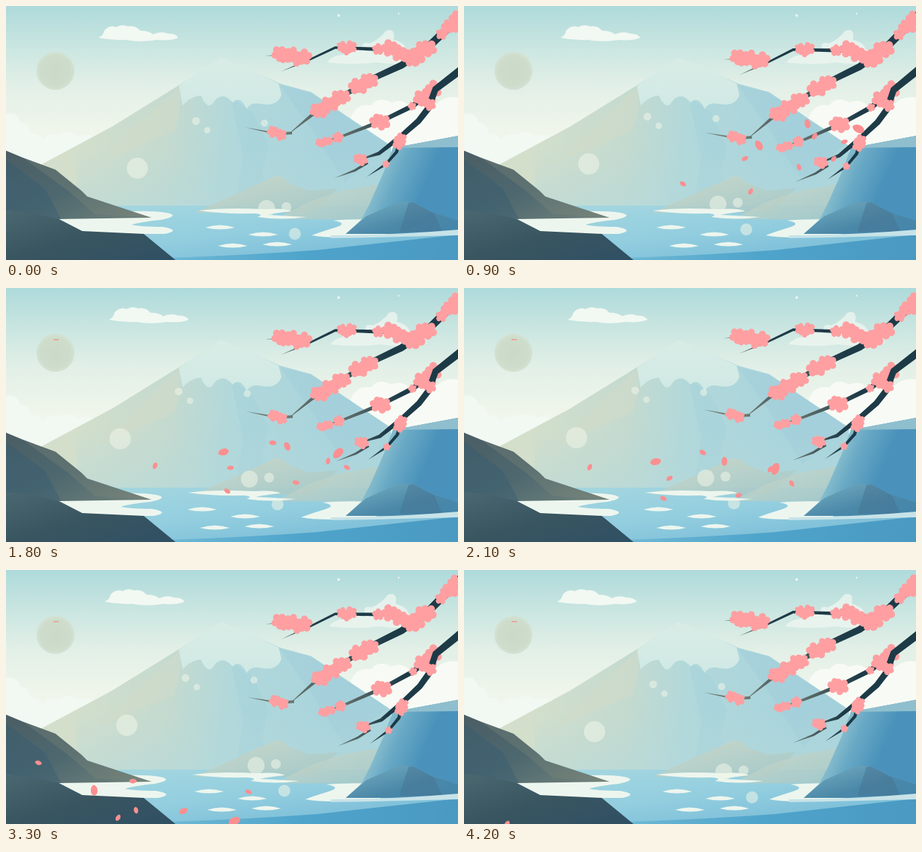
An HTML page that plays this animation: 640x360 px, repeating every 4500 ms.

```html
<!DOCTYPE html>
<html lang="en">
<head>
<meta charset="utf-8">
<title>Blossom lake</title>
<style>
html, body { margin: 0; width: 100%; height: 100%; overflow: hidden; background: #bfe0de; }
svg { display: block; width: 100vw; height: 100vh; }
</style>
</head>
<body>
<svg viewBox="0 0 640 360" preserveAspectRatio="none">
  <defs>
    <linearGradient id="sky" x2="0" y2="1">
      <stop stop-color="#aedadb"/><stop offset=".26" stop-color="#cbe6e1"/>
      <stop offset=".5" stop-color="#e3f0e7"/><stop offset=".8" stop-color="#f1f6ec"/>
    </linearGradient>
    <radialGradient id="sun">
      <stop stop-color="#cbdac8"/><stop offset=".8" stop-color="#cedccb"/><stop offset="1" stop-color="#d3e2d4"/>
    </radialGradient>
    <linearGradient id="peak" gradientUnits="userSpaceOnUse" x1="90" y1="170" x2="460" y2="200">
      <stop stop-color="#d4dfcb"/><stop offset=".38" stop-color="#c4dacf"/>
      <stop offset=".62" stop-color="#b1d8db"/><stop offset="1" stop-color="#a9d4dc"/>
    </linearGradient>
    <linearGradient id="mist" x2="0" y2="1">
      <stop stop-color="#b4d9dc" stop-opacity="0"/><stop offset="1" stop-color="#b4d9dc" stop-opacity=".8"/>
    </linearGradient>
    <linearGradient id="snow" x2="0" y2="1">
      <stop stop-color="#d9ece5"/><stop offset="1" stop-color="#d0e9e5"/>
    </linearGradient>
    <linearGradient id="water" x2="1" y2="1">
      <stop stop-color="#a9d9e0"/><stop offset=".5" stop-color="#93cedf"/><stop offset="1" stop-color="#6fb5d5"/>
    </linearGradient>
    <linearGradient id="near" x2="1" y2="0">
      <stop stop-color="#72bbd6"/><stop offset=".5" stop-color="#4fa4cb"/><stop offset="1" stop-color="#4a99c2"/>
    </linearGradient>
    <linearGradient id="cliff" gradientUnits="userSpaceOnUse" x1="515" y1="230" x2="590" y2="262">
      <stop stop-color="#9ccbd3"/><stop offset=".5" stop-color="#69a9c5"/><stop offset="1" stop-color="#4a92bb"/>
    </linearGradient>
    <linearGradient id="rock" x2="1" y2="1">
      <stop stop-color="#78b0c3"/><stop offset=".6" stop-color="#4b88a8"/><stop offset="1" stop-color="#4285ab"/>
    </linearGradient>
    <linearGradient id="bank" x2="1" y2="1">
      <stop stop-color="#4a5d64"/><stop offset=".5" stop-color="#4e686f"/><stop offset="1" stop-color="#73847c"/>
    </linearGradient>
    <linearGradient id="shore" x2="1" y2="1">
      <stop stop-color="#4b6871"/><stop offset=".5" stop-color="#395560"/><stop offset="1" stop-color="#2f5064"/>
    </linearGradient>
    <linearGradient id="knoll" x2="1" y2="1">
      <stop stop-color="#cfd9c7"/><stop offset="1" stop-color="#a3c6c6"/>
    </linearGradient>
  </defs>

  <rect width="640" height="230" fill="url(#sky)"/>
  <g fill="#e9f4ee"><circle cx="471" cy="13.500" r="2"/><circle cx="556" cy="11" r="1.200"/></g>
  <circle cx="70" cy="92" r="27" fill="url(#sun)"/>
  <path id="glint" d="M67 74Q68 71 71 73Q74 71 75 74Z" fill="#ef928b"/>

  <g fill="#f2f8f2">
    <path id="cloud" d="M131 45Q138 42 139 35Q147 26 156 30Q164 25 173 29Q183 27 190 35Q202 35 208 40Q220 35 229 39Q241 39 244 45Q232 50 214 48Q189 52 170 48Q150 49 131 45Z"/>
    <path id="veil" d="M455 80Q461 70 478 69Q492 60 505 61Q502 50 515 53Q528 48 538 35Q552 30 549 48Q565 52 567 62Q588 65 591 78Q560 85 525 80Q490 84 455 80Z" opacity=".7"/>
    <path d="M0 153Q17 150 20 165Q33 166 35 180Q47 180 52 190Q60 178 75 183Q88 174 101 184Q118 179 126 188Q139 172 158 173L180 230H0Z"/>
    <path d="M488 158Q497 137 517 141Q527 127 546 137Q561 130 573 143Q590 130 608 140Q623 126 640 130V210H500Z" fill="#f8fbf5"/>
  </g>

  <path d="M40 230L150 171L247 111L290 84Q310 76 330 84L388 110L432 122L545 198V300H130Z" fill="url(#peak)"/>
  <path d="M247 112L202 154L130 222L212 188L238 178Q248 152 247 137Z" fill="#d3dac6" opacity=".45"/>
  <path d="M318 129L350 152L372 199L362 240L402 276L325 284L336 214Z" fill="#9dccd7" opacity=".3"/>
  <path d="M388 112L432 123L540 195L480 250L436 180Z" fill="#98c8d8" opacity=".3"/>
  <path d="M245 113L288 83L304 74L333 84L386 110L390 126Q384 143 362 139Q346 135 341 146Q331 126 321 137Q305 118 292 139Q284 146 276 127Q263 127 250 141Z" fill="url(#snow)"/>
  <rect x="100" y="200" width="430" height="84" fill="url(#mist)" opacity=".6"/>

  <rect y="283" width="640" height="77" fill="url(#water)"/>
  <path d="M266 293L318 270L382 241Q394 241 399 250L430 262L470 258L435 293Z" fill="url(#knoll)" opacity=".85"/>
  <path d="M382 302L428 278L474 262L545 250V303Z" fill="url(#knoll)" opacity=".8"/>

  <g id="rivers" fill="#edf6ee">
    <path d="M40 298H190Q177 293 160 292Q202 289 227 293Q248 297 220 303Q190 306 178 310Q190 313 222 313Q249 318 225 323H40Z"/>
    <path d="M273 290Q310 285 365 288Q397 286 404 291Q384 293 369 296L425 299Q390 304 356 299Q367 295 351 294Q305 295 273 290Z"/>
    <path d="M540 303Q492 301 463 304Q486 308 466 314Q446 320 433 325Q461 331 540 325Z"/>
  </g>
  <g id="floes" fill="#edf6ee"></g>

  <path d="M640 184L570 197L548 200L535 235L515 280L503 303L481 323H640Z" fill="url(#cliff)"/>
  <path d="M640 184L570 197L560 201L640 200Z" fill="#8fbfce"/>
  <path d="M481 323L510 298L557 277L576 278L605 293L640 304V323Z" fill="url(#rock)"/>
  <path d="M557 320L570 279L576 278L606 294L618 320Z" fill="#477591" opacity=".5"/>
  <path d="M200 358Q330 354 440 346L640 324V360H200Z" fill="url(#near)"/>
  <path d="M460 325Q545 325 640 317V325L520 328L460 329Z" fill="#c7e3e8"/>

  <path d="M0 205L24 215L70 232L107 262L115 270L206 300L75 302L0 304Z" fill="url(#bank)"/>
  <path d="M24 215L70 232L107 262L115 270L206 300L126 295L88 262Z" fill="#838878" opacity=".3"/>
  <path d="M0 218L55 259L78 302H0Z" fill="#335b70" opacity=".4"/>
  <path d="M0 289L40 294L75 302L108 319L195 323L240 360H0Z" fill="url(#shore)"/>

  <g id="bubbles" fill="#f0f6e8" opacity=".55"></g>
  <g id="tree"></g>
  <g id="petals" fill="#fb8f90"></g>
</svg>

<script>
const LOOP = 4500, STEP = 300;
const $ = id => document.getElementById(id);
const add = (tag, attrs, parent) => {
  const el = document.createElementNS('http://www.w3.org/2000/svg', tag);
  for (const k in attrs) el.setAttribute(k, attrs[k]);
  return parent.appendChild(el);
};
let seed = 7;
const rnd = () => (seed = seed * 16807 % 2147483647) / 2147483647;

// Height of a limb at x; limbs run from right to left
function heightAt(pts, x) {
  let i = 1;
  while (i < pts.length - 1 && x < pts[i][0]) i++;
  const [ax, ay] = pts[i - 1], [bx, by] = pts[i];
  return ay + (by - ay) * (x - ax) / (bx - ax);
}

function limb({ pts, width }, fill, parent) {
  const first = pts[0][0], span = first - pts[pts.length - 1][0];
  const left = [], right = [];
  pts.forEach(([x, y], i) => {
    const a = pts[Math.max(0, i - 1)], b = pts[Math.min(pts.length - 1, i + 1)];
    const dx = b[0] - a[0], dy = b[1] - a[1];
    const k = width * Math.sqrt(1 - (first - x) / span) / 2 / Math.hypot(dx, dy);
    left.push([x - dy * k, y + dx * k]);
    right.unshift([x + dy * k, y - dx * k]);
  });
  add('polygon', { points: left.concat(right).join(' '), fill }, parent);
}

function blossom(x, y, r, parent) {
  const g = add('g', { transform: `translate(${x} ${y}) rotate(${rnd() * 72})`, fill: '#ff9fa1' }, parent);
  const p = r * .42;
  add('circle', { r: r * .62 }, g);
  for (let i = 0; i < 5; i++) {
    const a = i * Math.PI * .4;
    add('circle', { cx: Math.cos(a) * (r - p), cy: Math.sin(a) * (r - p), r: p }, g);
  }
}

// Blossoms of about radius r along a limb between x = from and x = to
function clump(pts, [from, to, r], parent) {
  const rise = heightAt(pts, to) - heightAt(pts, from);
  const n = Math.round(Math.hypot(to - from, rise) / (r * .85));
  for (let i = 0; i <= n; i++) {
    const x = from + (to - from) * (n ? i / n : 0);
    const lift = n ? (i % 2 - .5) * r * .4 : 0;
    blossom(x, heightAt(pts, x) + lift, r * (.9 + rnd() * .2), parent);
  }
}

// pivot and deg set the sway; bark fades from the tip to dark at x = dark
const boughs = [
  { pivot: [600, 60], deg: 1.4, tip: 370, dark: 440, limbs: [
    { width: 6, pts: [[585, 70], [545, 62], [466, 59], [430, 76], [389, 93]],
      blooms: [[476, 488, 9], [527, 527, 9], [543, 556, 12]] },
    { width: 4, pts: [[430, 76], [396, 69], [367, 71]], blooms: [[387, 422, 11]] }] },
  { pivot: [640, 80], deg: 1.6, tip: 390, dark: 540, limbs: [
    { width: 12, pts: [[646, 12], [600, 56], [560, 84], [512, 106], [435, 153], [397, 184]],
      blooms: [[626, 638, 11], [617, 617, 8], [572, 598, 13], [496, 517, 11], [440, 478, 11]] },
    { width: 4, pts: [[405, 180], [383, 181], [339, 172]], blooms: [[378, 389, 9]] }] },
  { pivot: [620, 110], deg: 2.6, tip: 460, dark: 560, limbs: [
    { width: 8, pts: [[614, 114], [575, 142], [532, 163], [480, 183], [440, 196]],
      blooms: [[588, 606, 12], [575, 575, 6], [525, 533, 11], [444, 457, 6], [470, 470, 9]] }] },
  { pivot: [640, 110], deg: 1.9, tip: 465, dark: 535, limbs: [
    { width: 11, pts: [[646, 89], [608, 118], [598, 145], [584, 163], [560, 184], [528, 209], [496, 219]],
      blooms: [[600, 600, 10], [499, 504, 8]] },
    { width: 4, pts: [[512, 222], [494, 233], [465, 244]], blooms: [] },
    { width: 5, pts: [[560, 183], [553, 207], [538, 224], [511, 242]],
      blooms: [[556, 559, 9], [538, 538, 6]] }] }
];
boughs.forEach((b, i) => {
  b.el = add('g', {}, $('tree'));
  const bark = add('linearGradient', { id: 'bark' + i, gradientUnits: 'userSpaceOnUse',
    x1: b.tip, y1: 0, x2: b.dark, y2: 0 }, b.el);
  add('stop', { offset: 0, 'stop-color': '#707b73' }, bark);
  add('stop', { offset: 1, 'stop-color': '#1d3a47' }, bark);
  b.limbs.forEach(l => limb(l, `url(#bark${i})`, b.el));
  b.limbs.forEach(l => l.blooms.forEach(c => clump(l.pts, c, b.el)));
});

for (const [cx, cy, r] of [[369, 287, 12], [397, 285, 7], [409, 323, 8.500], [186, 230, 15],
  [269, 163, 5.500], [285, 176, 4.500], [366, 166, 5]]) add('circle', { cx, cy, r }, $('bubbles'));

for (const [x, y] of [[303, 314], [364, 324], [384, 338], [321, 340]])
  add('path', { d: `M${x - 21} ${y}q21-7 42 0q-21 5-42 0Z` }, $('floes'));

// Petals, largest first: place at 1.2 s, then speed per second
const petals = [
  [529, 193, -98, 65], [381, 208, -122, 37], [457, 185, -98, 62], [457, 195, -132, 37],
  [277, 251, -110, -2], [371, 228, -89, 41], [453, 243, -71, 51], [375, 270, -103, 26],
  [501, 225, -75, 30], [520, 212, -62, 67]
].map(([x, y, vx, vy], i) => ({
  x, y, vx, vy, size: Math.max(5, 9 - 1.2 * i),
  el: add('path', { d: 'M-1 0Q-.7-.7 .2-.6Q.9-.5 1 .1Q.7 .7-.1 .6Q-.8 .5-1 0Z' }, $('petals'))
}));

function fly({ x, y, vx, vy, size, el }, i, t) {
  const s = t / 1000 - 1.2;
  const spin = i * 67 - 30 + Math.sin(t / 520 + i) * 55;
  el.setAttribute('transform',
    `translate(${x + vx * s} ${y + vy * s + 6 * s * s}) rotate(${spin}) scale(${size})`);
}

const wave = (t, period) => (1 - Math.cos(2 * Math.PI * t / period)) / 2;
const shift = (id, x, y = 0) => $(id).setAttribute('transform', `translate(${x} ${y})`);

function draw(t) {
  const drift = wave(t, LOOP), sway = wave(t, LOOP / 2);
  shift('cloud', 16 * drift);
  shift('veil', 5 * drift);
  shift('rivers', -17 * drift);
  shift('floes', -28 * drift);
  shift('bubbles', -27 * drift, -18 * drift);
  for (const b of boughs) b.el.setAttribute('transform', `rotate(${-b.deg * sway} ${b.pivot})`);
  $('glint').style.display = t < 1200 ? 'none' : '';
  $('petals').style.display = t < 600 ? 'none' : '';
  petals.forEach((p, i) => fly(p, i, t));
}

const start = performance.now();
function tick() {
  const t = (performance.now() - start) % LOOP;
  draw(Math.floor(t / STEP) * STEP);
  requestAnimationFrame(tick);
}
tick();
</script>
</body>
</html>
```
